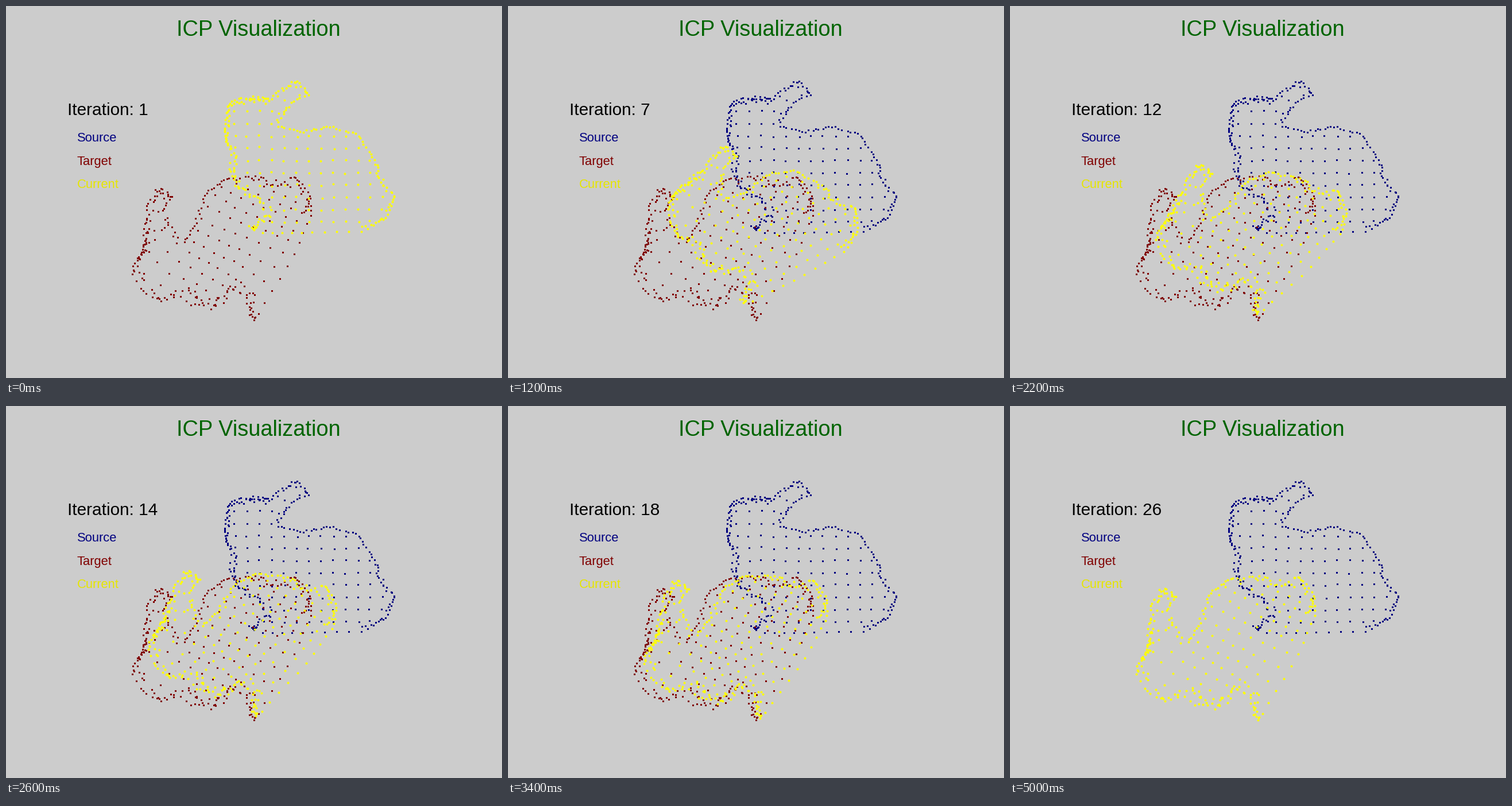
A matplotlib script for the animation above (5200 ms loop, 864 by 648 pixels).

```python
import numpy as np
import matplotlib.pyplot as plt
from matplotlib.animation import FuncAnimation
from matplotlib.path import Path

W, H, DPI = 864, 648, 72
STEPS, STEP_MS = 26, 200
GRID = 21.4
TURN = np.radians(53)
NAVY, MAROON, YELLOW = "#000080", "#800000", "#ffff00"

# Rim of the scan, clockwise: dots, band width, then the key points
# (x, y in the first pose, x, y in the aligned pose).
PARTS = {
    "ear": (36, 9, [(460, 160, 245, 362), (480, 138, 246, 331),
                    (508, 126, 268, 310), (528, 154, 290, 331),
                    (490, 178, 282, 373)]),
    "back": (32, 3, [(472, 207, 306, 408), (516, 217, 327, 377),
                     (563, 208, 347, 324), (612, 222, 380, 300)]),
    "tail": (36, 8, [(646, 272, 440, 294), (651, 292, 459, 303),
                     (677, 333, 505, 297), (659, 375, 535, 334)]),
    "base": (10, 0, [(618, 392, 530, 364), (526, 394, 498, 439)]),
    "belly": (54, 12, [(430, 394, 432, 551), (422, 383, 424, 538),
                       (455, 360, 415, 498), (402, 319, 365, 528),
                       (387, 290, 325, 526)]),
    "face": (30, 7, [(391, 253, 298, 505), (379, 232, 262, 518),
                     (381, 195, 217, 465)]),
    "crown": (30, 12, [(388, 164, 235, 428), (425, 155, 238, 403)]),
}
keys = np.array([p for *_, pts in PARTS.values() for p in pts], float)
key_start, key_goal = keys[:, :2], keys[:, 2:]


def rim_dots(rng):
    """Dots along the rim, set inwards; also the same dots unfolded."""
    loop = np.vstack([keys, keys[:1]])
    dist = np.r_[0, np.cumsum(np.linalg.norm(np.diff(loop, axis=0), axis=1))]
    seen, flat, first = [], [], 0
    for count, band, pts in PARTS.values():
        last = first + len(pts)
        t = np.linspace(dist[first], dist[last], count, endpoint=False)
        if band:
            t += rng.uniform(-3, 3, count)
        seg = np.clip(np.searchsorted(dist, t, side="right") - 1,
                      0, len(keys) - 1)
        along = (loop[seg + 1] - loop[seg])[:, :2]
        along /= np.linalg.norm(along, axis=1)[:, None]
        inward = np.c_[-along[:, 1], along[:, 0]]
        edge = np.c_[np.interp(t, dist, loop[:, 0]),
                     np.interp(t, dist, loop[:, 1])]
        depth = band * rng.random(count)[:, None] ** 1.3
        seen.append(edge + depth * inward)
        flat.append(edge + 1.7 * depth * inward)
        first = last
    return np.vstack(seen), np.vstack(flat)


def grid_dots(rng, rim):
    xs = 484 + GRID * np.arange(-6, 10)
    ys = 290 + GRID * np.arange(-7, 5)
    pts = np.stack(np.meshgrid(xs, ys), -1).reshape(-1, 2)
    pts += rng.normal(0, 1, pts.shape)
    gap = np.linalg.norm(pts[:, None] - rim[None], axis=2).min(1)
    return pts[Path(key_start).contains_points(pts) & (gap > 5)]


def warp(pts, a, b, smooth=60):
    """Thin-plate spline taking spots a to spots b."""
    def kernel(p):
        r2 = ((p[:, None] - a[None]) ** 2).sum(2)
        return r2 * np.log(r2 + 1e-9)

    n = len(a)
    lin = np.c_[np.ones(n), a]
    m = np.block([[kernel(a) + smooth * np.eye(n), lin],
                  [lin.T, np.zeros((3, 3))]])
    coef = np.linalg.solve(m, np.vstack([b, np.zeros((3, 2))]))
    return np.c_[kernel(pts), np.ones(len(pts)), pts] @ coef


def as_complex(pts):
    return pts[..., 0] + 1j * pts[..., 1]


rng = np.random.default_rng(7)
rim, rim_flat = rim_dots(rng)
inner = grid_dots(rng, rim)
start = as_complex(np.vstack([rim, inner]))
goal = as_complex(warp(np.vstack([rim_flat, inner]), key_start, key_goal))
mid_start = as_complex(key_start.mean(0))
mid_goal = as_complex(key_goal.mean(0))


def cloud_at(step):
    left = 1 - step / (STEPS - 1)
    s = 1 - left ** 2.15  # share of the turn already made
    # The centre jumps at first, then drifts.
    far = 0.6 * left ** 1.3 + 0.4 * np.exp(-0.6 * step) * (left > 0)
    gap = mid_start - mid_goal
    centre = mid_goal + gap.real * far + 1j * gap.imag * far ** 1.5
    shape = ((1 - s) * (start - mid_start)
             + s * np.exp(1j * TURN) * (goal - mid_goal))
    return centre + np.exp(-1j * TURN * s) * shape


def pixels(cloud):
    return np.floor(cloud.real) + 0.5, np.floor(cloud.imag) + 0.5


plt.rcParams["font.family"] = "Liberation Sans"
fig = plt.figure(figsize=(W / DPI, H / DPI), dpi=DPI, facecolor="#cccccc")
ax = fig.add_axes([0, 0, 1, 1])
ax.set(xlim=(0, W), ylim=(H, 0))
ax.axis("off")


def label(x, y, text, size, color):
    return ax.text(x, y, text, size=size, color=color, va="baseline")


def dots(cloud, marker, size, color):
    return ax.plot(*pixels(cloud), marker, ms=size, mew=0, color=color)[0]


label(296.8, 52, "ICP Visualization", 38, "#006400")
counter = label(107.3, 190, "", 29.8, "black")
label(123.7, 236, "Source", 22, NAVY)
label(123.7, 276.5, "Target", 22, MAROON)
label(123.7, 317, "Current", 22, "#e6e600")

dots(start, "s", 3, NAVY)
dots(goal, "s", 3, MAROON)
moving = dots(start, "o", 4, YELLOW)


def draw(step):
    counter.set_text(f"Iteration: {step + 1}")
    moving.set_data(*pixels(cloud_at(step)))
    return counter, moving


anim = FuncAnimation(fig, draw, frames=STEPS, interval=STEP_MS,
                     repeat=True, repeat_delay=0)
plt.show()
```
